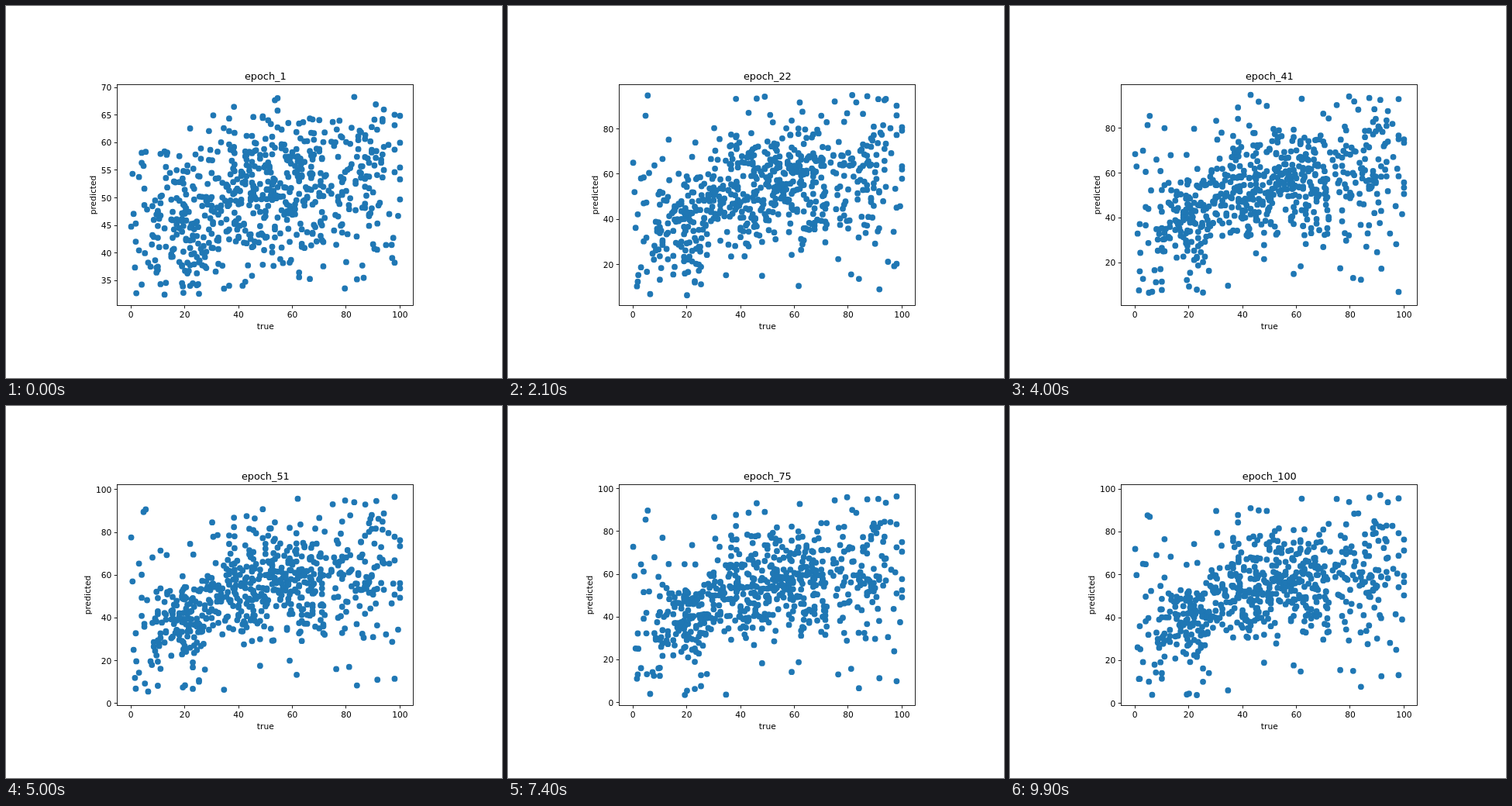
These frames come from a looping animation (640 by 480 pixels, 10000 ms). An HTML page with a canvas:

```html
<!DOCTYPE html>
<html lang="en">
<head>
<meta charset="utf-8">
<title>Predicted against true, by epoch</title>
<style>
  html, body { margin: 0; width: 100%; height: 100%; overflow: hidden; background: #fff; }
  canvas { display: block; }
</style>
</head>
<body>
<canvas id="stage" width="640" height="480"></canvas>
<script>
const ctx = document.getElementById('stage').getContext('2d');
const FONT = '"DejaVu Sans", sans-serif';
const STEP = 100, EPOCHS = 100;
const BOX = { left: 143.5, top: 101.5, width: 382, height: 285 };

// Smallest and largest prediction: [epoch, min, max]
const RANGE = [
  [0, 32.3, 68.7], [1, 25, 80], [3, 14, 92], [6, 9, 96.5], [9, 8.4, 95],
  [11, 8.2, 94.7], [16, 7, 97], [20, 6.5, 94.8], [27, 6, 96.6], [31, 6.2, 95],
  [44, 5, 95], [50, 3.8, 97.6], [64, 3.9, 97.2], [74, 3.4, 97.1], [99, 3.8, 97.3]
];

// Outlying points: true value, settled prediction
const OUTLIERS = [
  0.1, 73.5, 0.6, 60, 1, 27.8, 1.5, 10, 1.8, 11, 1.8, 34.8, 2, 23.8, 3, 18,
  3, 65, 4, 63.5, 4, 50, 4, 36.8, 4.7, 86.5, 5.5, 88.5, 5, 39.5, 5.2, 11.5,
  5, 33.5, 6.4, 4, 6, 52, 8, 70, 7.3, 16.5, 7.8, 14, 11, 75, 13.3, 66.8,
  10, 12, 19.2, 63.5, 19.3, 3.8, 20.1, 6.2, 23, 3.9, 22, 76, 23.2, 65.5, 25.3, 10,
  25.3, 15, 30.2, 88.5, 30.6, 78.3, 32.2, 74.7, 34.6, 5.8, 37, 74.2, 38.3, 89.5, 38.3, 84.8,
  43, 91.2, 46, 90.7, 49, 88.5, 62, 95.3, 75, 96.8, 79.6, 94, 76.3, 14, 84, 9.2,
  91.6, 12.5, 98, 12, 91.2, 97.3, 98, 94, 87.1, 94.5, 94, 93, 61.6, 16.5, 59, 16.5,
  48, 20.5, 81.1, 16.8, 100, 76.8, 100, 70.8, 100, 58, 100, 55, 100, 51.5, 99.3, 38.5,
  96.9, 43, 97.1, 25.5, 94.8, 28.3, 90, 29, 83.9, 33.2, 95.7, 82.7
];

// The main cloud: true from, to, count, prediction from, to
const CLOUD = [
  [8, 17, 45, 13, 60], [17, 28, 85, 15, 62], [28, 36, 45, 28, 70],
  [36, 48, 105, 26, 82], [48, 72, 205, 28, 84], [72, 75, 6, 45, 88],
  [75, 93, 85, 26, 94], [93, 98.5, 12, 45, 92]
];

let seed = 20;
function random() {
  seed = (seed * 1664525 + 1013904223) % 4294967296;
  return seed / 4294967296;
}

function makePoint(x, settled) {
  const residual = settled - (34 + 0.33 * x);
  return {
    x, settled,
    first: 43 + 0.13 * x + 0.28 * residual + 14 * (random() + random() - 1),
    phase: random() * 2 * Math.PI,
    rate: 0.4 + random() * 1.4
  };
}

const points = [];
for (let i = 0; i < OUTLIERS.length; i += 2) {
  points.push(makePoint(OUTLIERS[i], OUTLIERS[i + 1]));
}
for (const [x0, x1, count, y0, y1] of CLOUD) {
  for (let i = 0; i < count; i++) {
    const x = Math.round((x0 + (x1 - x0) * random()) * 2) / 2;
    points.push(makePoint(x, y0 + (y1 - y0) * (random() + random()) / 2));
  }
}

function rangeAt(epoch) {
  const next = Math.max(1, RANGE.findIndex(key => key[0] >= epoch));
  const a = RANGE[next - 1], b = RANGE[next];
  const k = (epoch - a[0]) / (b[0] - a[0]);
  return [1, 2].map(i => a[i] + (b[i] - a[i]) * k);
}

function predict(p, epoch, min, max) {
  const learned = 1 - Math.exp(-epoch / 2);
  const unrest = learned * (14 * Math.exp(-epoch / 35) + 0.8);
  const y = p.first + (p.settled - p.first) * learned
    + unrest * Math.sin(p.phase + p.rate * epoch);
  // Fold values back inside the range
  if (y > max) return 2 * max - y;
  return y < min ? 2 * min - y : y;
}

function label(text, x, y, size = 10.69, align = 'center') {
  ctx.font = `${size}px ${FONT}`;
  ctx.textAlign = align;
  ctx.fillText(text, x, y);
}

function draw(epoch) {
  const [min, max] = rangeAt(epoch);
  const span = max - min;
  const toX = v => 161.2 + v * 3.472;
  const toY = v => 373.3 - (v - min) / span * 258.7;

  ctx.fillStyle = '#fff';
  ctx.fillRect(0, 0, 640, 480);

  ctx.fillStyle = '#1f77b4';
  for (const p of points) {
    ctx.beginPath();
    ctx.arc(toX(p.x), toY(predict(p, epoch, min, max)), 3.9, 0, 2 * Math.PI);
    ctx.fill();
  }

  ctx.fillStyle = ctx.strokeStyle = '#000';
  ctx.lineWidth = 0.86;
  ctx.strokeRect(BOX.left, BOX.top, BOX.width, BOX.height);

  ctx.beginPath();
  for (let v = 0; v <= 100; v += 20) {
    const x = Math.floor(toX(v)) + 0.5;
    ctx.moveTo(x, 386.5);
    ctx.lineTo(x, 390.3);
    label(v, toX(v), 402);
  }

  const low = min - span * 0.05, high = max + span * 0.05;
  const step = [5, 10, 20].find(s => s >= (high - low) / 9);
  for (let v = Math.ceil(low / step) * step; v <= high; v += step) {
    const y = Math.floor(toY(v)) + 0.5;
    ctx.moveTo(143.5, y);
    ctx.lineTo(139.7, y);
    label(v, 136.4, toY(v) + 4, 10.69, 'right');
  }
  ctx.stroke();

  label('epoch_' + (epoch + 1), 334.8, 95.2, 12.83);
  label('true', 334.8, 417);
  ctx.save();
  ctx.translate(high >= 100 ? 109.4 : 116.2, 244);
  ctx.rotate(-Math.PI / 2);
  label('predicted', 0, 0);
  ctx.restore();
}

const start = performance.now();
function tick() {
  draw(Math.floor((performance.now() - start) / STEP) % EPOCHS);
  requestAnimationFrame(tick);
}
tick();
</script>
</body>
</html>
```
